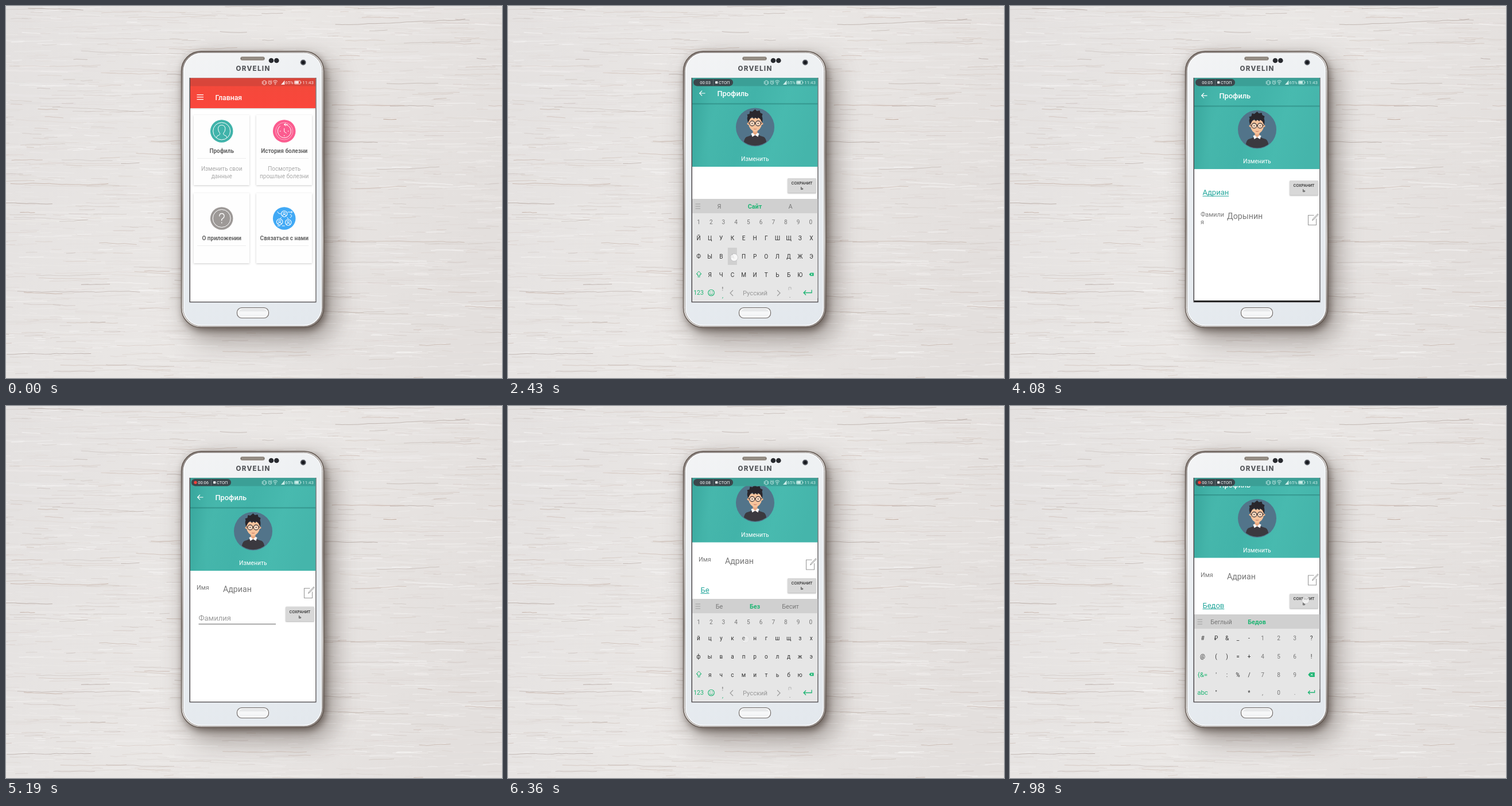
Write an HTML page with a canvas that moves like this. It is 864x648 px and loops after 8 s.

```html
<!DOCTYPE html>
<html lang="ru">
<head>
<meta charset="utf-8">
<style>
html, body { margin: 0; width: 100%; height: 100%; overflow: hidden; background: #e4e0dd; }
canvas { display: block; }
</style>
</head>
<body>
<canvas id="stage" width="864" height="648"></canvas>
<script>
const LOOP = 8000;
const FIRST = 'Адриан', LAST = 'Дорынин', NEW_LAST = 'Бедов';
const GREEN = '#20b574';
const stage = document.getElementById('stage');
let g = stage.getContext('2d');

// ---------- helpers ----------
const clamp = v => Math.max(0, Math.min(1, v));
const ease = (t, a, b) => { const p = clamp((t - a) / (b - a)); return p * p * (3 - 2 * p); };
function rect(x, y, w, h, fill) { g.fillStyle = fill; g.fillRect(x, y, w, h); }
function round(x, y, w, h, r, fill, stroke, lw = 1) {
  g.beginPath(); g.roundRect(x, y, w, h, r); paint(fill, stroke, lw);
}
function circle(x, y, r, fill, stroke, lw = 1) {
  g.beginPath(); g.arc(x, y, r, 0, 7); paint(fill, stroke, lw);
}
function shape(d, fill, stroke, lw = 1, x = 0, y = 0) {
  g.save(); g.translate(x, y);
  const p = new Path2D(d);
  if (fill) { g.fillStyle = fill; g.fill(p); }
  if (stroke) { g.strokeStyle = stroke; g.lineWidth = lw; g.stroke(p); }
  g.restore();
}
function paint(fill, stroke, lw) {
  if (fill) { g.fillStyle = fill; g.fill(); }
  if (stroke) { g.strokeStyle = stroke; g.lineWidth = lw; g.stroke(); }
}
function shadowed(color, blur, dx, dy, draw) {
  g.save();
  g.shadowColor = color; g.shadowBlur = blur; g.shadowOffsetX = dx; g.shadowOffsetY = dy;
  draw();
  g.restore();
}
function text(s, x, y, size, color, align = 'left', weight = 400) {
  g.font = `${weight} ${size}px Roboto, sans-serif`;
  g.textAlign = align; g.fillStyle = color; g.fillText(s, x, y);
}
function gradient(x0, y0, x1, y1, ...colors) {
  const gr = g.createLinearGradient(x0, y0, x1, y1);
  colors.forEach((c, i) => gr.addColorStop(i / (colors.length - 1), c));
  return gr;
}

// ---------- table and phone, drawn once ----------
let seed = 11;
const rnd = () => (seed = (seed * 16807) % 2147483647) / 2147483647;

function grain(count, colors, maxLen, maxAlpha, maxWidth) {
  for (let i = 0; i < count; i++) {
    let x = rnd() * 960 - 90, y = rnd() * 648;
    const end = x + 10 + rnd() * rnd() * maxLen, slope = (rnd() - .4) * .05;
    g.globalAlpha = maxAlpha * (.2 + .8 * rnd());
    g.strokeStyle = colors[Math.floor(rnd() * colors.length)];
    g.lineWidth = .4 + rnd() * maxWidth;
    g.beginPath(); g.moveTo(x, y);
    while (x < end) { x += 4 + rnd() * 8; y += slope * 8 + (rnd() - .5) * 1.6; g.lineTo(x, y); }
    g.stroke();
  }
  g.globalAlpha = 1;
}

function drawTable() {
  rect(0, 0, 864, 648, gradient(0, 0, 864, 300, '#e4e1e0', '#eae7e5', '#e3dfdd'));
  grain(300, ['#fff', '#d6cfcc', '#f5f2f1'], 300, .22, 4);
  grain(2200, ['#fff', '#cabfba', '#d8cdc8', '#f8f6f5'], 90, .5, 1.1);
  grain(260, ['#b59c8e', '#c2aba0', '#a3938c'], 240, .7, .7);
}

function drawPhone() {
  const body = () => round(305.5, 79, 248, 481, 34, '#7d716b');
  shadowed('rgba(70,56,50,.55)', 46, 13, 17, body);
  shadowed('rgba(60,48,42,.6)', 13, 3, 5, body);
  round(304, 198, 3, 52, 1, '#a09893'); round(552, 197, 3, 46, 1, '#837a75');
  round(305.5, 79, 248, 481, 34, gradient(306, 79, 553, 560, '#857c78', '#d8d5d3', '#a39c98', '#e0dedc', '#857c77'), '#61564f', 1.3);
  round(308.5, 81.5, 242, 476, 32, gradient(308, 81, 550, 556, '#f3f4f5', '#e9edf1', '#e3e8ed'), '#8b8582', 1);
  round(309.5, 82.5, 240, 474, 31, null, '#fbfcfd', 1.4);
  round(408.5, 88.5, 42, 6, 3, '#777069', '#aaa39d');
  for (let x = 411; x < 449; x += 2) rect(x, 89.5, 1, 4, '#b7ada3');
  circle(462, 95, 4.3, '#282a2f'); circle(471.3, 95, 4.3, '#282a2f');
  circle(517.7, 98.3, 5, '#40434a', '#c8cbd0'); circle(517.7, 98.3, 2.6, '#15171c');
  g.letterSpacing = '1.3px';
  g.font = '800 11.6px Inter, sans-serif'; g.textAlign = 'center';
  g.fillStyle = '#55575b'; g.fillText('ORVELIN', 430.5, 113);
  g.letterSpacing = '0px';
  round(402.5, 525.5, 55, 18, 8, gradient(0, 525, 0, 543, '#cfd1d3', '#f8f9fa', '#eceef0'), '#76706d', 1.2);
  round(404.5, 527.3, 51, 14.4, 7, null, '#fff', 1.2);
  rect(319.5, 125, 221, 391.3, '#4c484a');
}

const backdrop = document.createElement('canvas');
backdrop.width = 864; backdrop.height = 648;
const screenCtx = g;
g = backdrop.getContext('2d');
drawTable(); drawPhone();
g = screenCtx;

// ---------- status bar ----------
function drawStatus(t, color, ink) {
  rect(320, 125, 221, 14.5, color);
  round(448, 130, 4, 7, 1, null, ink, .9);
  shape('M446.3 131v5M453.7 131v5', null, ink, .8);
  circle(460, 133.5, 2.8, null, ink, .9);
  shape('M460 131.7v2h1.5M456.8 130.8l1.6-1.5M463.2 130.8l-1.6-1.5', null, ink, .8);
  shape('M465 131.5q4-3.6 8 0M466.4 133.4q2.6-2.2 5.2 0M467.7 135.2q1.3-1 2.6 0', null, ink, 1);
  circle(469, 136.5, .7, ink);
  shape('M479 137l6.5-7.5v7.5z', ink);
  text('65%', 486.5, 136, 7.6, ink);
  round(502.5, 130.3, 10.5, 5.8, 1, null, ink, .8); rect(503.3, 131, 6.5, 4.4, ink); rect(513.3, 132, 1, 2.5, ink);
  text('11:43', 516.3, 136, 7.9, ink);
  if (t < 60) return;
  const sec = t * .00125 + .1;
  round(323, 127, 69, 12.4, 6.2, '#3b474c');
  if (sec % 1 > .5 || sec > 10) circle(330, 133.3, 2.7, '#f4403a');
  text('00:' + String(Math.floor(sec)).padStart(2, '0'), 334.3, 136.1, 7.5, '#fff');
  rect(357, 128, .7, 10.4, '#6c777b');
  rect(361.2, 131.2, 4, 4, '#fff');
  text('СТОП', 367, 136.1, 7.4, '#fff');
}

// ---------- home ----------
const homeIcons = {
  profile(x, y) {
    circle(x, y, 15, null, '#fff');
    shape('M-9 11q0-3 5-4.5q1.5-1 .8-3q-3-3-3-8q.5-6 6.2-6t6.2 6q0 5-3 8q-.7 2 .8 3q5 1.5 5 4.5', null, '#fff', 1, x, y);
  },
  history(x, y) {
    shape('M-7-9a11.5 11.5 0 1 0 7-2.5h6M3-14l-3.5 2.5l3.5 2.5M0-5v6l4 2.5M-8 0h2M6 0h2M0 7v2', null, '#fff', 1, x, y);
    circle(x, y, 15, null, 'rgba(255,255,255,.6)', .8);
  },
  about(x, y) {
    circle(x, y, 15.5, null, '#fff');
    shape('M-4-3.5q0-5 4.2-5t4.2 4.5q0 2.5-2.5 4t-1.9 4M0 6.5v2', null, '#fff', 1.3, x, y);
  },
  contact(x, y) {
    for (const [dx, dy] of [[0, -8], [-8, 6], [7, 7]]) {
      circle(x + dx, y + dy, 5.2, null, '#fff', 1.1);
      circle(x + dx, y + dy - 1.3, 1.8, null, '#fff', 1);
      shape('M-3 4q0-3 3-3t3 3', null, '#fff', 1, x + dx, y + dy);
    }
    shape('M-12-12q2 5 6 4M6-11h8M12-13l2 2l-2 2M10-7q6 2 0 6M-12 13h5M-4 13h5M-5-2l-2 3M5-2l2 3', null, '#fff', 1, x, y);
  }
};

function drawCard(x, y, iconY, color, icon, title, lines = []) {
  const c = x + 48.7;
  shadowed('rgba(0,0,0,.2)', 3, 0, 1, () => rect(x, y, 97, 122, '#fefefe'));
  circle(c, iconY, 19.8, color);
  homeIcons[icon](c, iconY);
  text(title, c, iconY + 38, 10, '#666', 'center', 700);
  rect(x + 6, iconY + 47, 85, 1, '#eee');
  lines.forEach((s, i) => text(s, c, iconY + 69 + i * 12.5, 10, '#a9a9a9', 'center'));
}

function drawHome(t) {
  rect(320, 125, 221, 391, '#fff');
  rect(320, 139, 221, 39, gradient(0, 139, 0, 178, '#f4493b', '#fa463c'));
  rect(320, 178, 221, 2, 'rgba(0,0,0,.1)');
  for (const y of [154, 158, 162]) rect(332.5, y, 11.5, 1.3, '#fff');
  text('Главная', 364.5, 164, 12.3, '#fff', 'left', 500);
  drawCard(327, 190, 218, '#40b3aa', 'profile', 'Профиль', ['Изменить свои', 'данные']);
  drawCard(436, 190, 218, '#fb5c8f', 'history', 'История болезни', ['Посмотреть', 'прошлые болезни']);
  drawCard(327, 326, 370, '#9d9997', 'about', 'О приложении');
  drawCard(436, 326, 370, '#41a9f5', 'contact', 'Связаться с нами');
  rect(327, 190, 97, 122, `rgba(0,0,0,${.08 * ease(t, 160, 300)})`);
  drawStatus(t, '#d8453a', 'rgba(255,255,255,.85)');
}

// ---------- profile ----------
function drawAvatar(x, y) {
  g.save(); g.translate(x, y);
  circle(0, 0, 33.5, '#52748a');
  g.beginPath(); g.arc(0, 0, 32.3, 0, 7); g.clip();
  shape('M-21 36q1-17 6-19q7-2 10-4h10q3 2 10 4q5 2 6 19z', '#3b393f');
  rect(-4, 4, 8, 10, '#e9a981');
  shape('M-7 11l3-1l4 4l4-4l3 1l-2 6l-5-3l-5 3z', '#f6f6f6');
  shape('M-11.5-16h23v11q-1 9-11.5 14q-10.500-5-11.500-14z', '#f6c39c');
  circle(-12, -6, 2, '#f0b68d'); circle(12, -6, 2, '#f0b68d');
  shape('M-12-8q-3-6-1-11l-1-3l4-1l1-5l4 1l5-4l3 3l5-1l1 4l4 2l-1 4q2 6 0 11l-3-6l-4-3l-1 3l-4-3l-2 3l-3-4l-4 4z', '#29262c');
  for (const side of [-1, 1]) {
    circle(side * 5.2, -6.5, 4.4, 'rgba(255,255,255,.35)', '#322e31', 1.1);
    circle(side * 5.2, -6.5, .9, '#322e31');
  }
  shape('M-9.500-7h-2.500M9.500-7h2.500M-1-7h2', null, '#322e31', 1.1);
  shape('M-2.500 3q2.500 1.300 5 0', null, '#c26f5b', 1);
  g.restore();
}

function drawPencil(y) {
  shape('M529.500 2.500h-10v17h14v-11', null, '#999', 1.1, 0, y);
  shape('M526.500 11.500l1-2.500l8.500-9l1.300 1.300l-8.600 9z', '#eee', '#8c8c8c', .9, 0, y);
}

function drawSave(y) {
  shadowed('rgba(0,0,0,.3)', 2, 0, 1, () => round(487, y, 50, 25.5, 1.5, '#d8d8d8'));
  text('СОХРАНИТ', 512, y + 11, 7.1, '#333', 'center', 500);
  text('Ь', 512, y + 20, 7.1, '#333', 'center', 500);
}

function drawField(y, hint, value, focused) {
  if (value) {
    text(value, 335.5, y, 13, '#24a79c');
    rect(335.5, y + 1.6, g.measureText(value).width, 1, '#24a79c');
  } else if (!focused) {
    text(hint, 335.5, y, 13, '#9b9b9b');
    rect(335.5, y + 5.3, 134.5, 1.2, '#777');
  }
}

function drawHeader() {
  rect(320, 125, 221, 162, gradient(320, 125, 541, 190, '#3fada3', '#46b7ac', '#42b3a9', '#48baaf', '#45b5ab'));
  rect(320, 140, 30, 147, gradient(320, 0, 350, 0, 'rgba(20,125,118,.16)', 'rgba(20,125,118,0)'));
  rect(320, 176.5, 221, 3, gradient(0, 176.5, 0, 179.5, 'rgba(10,75,72,.4)', 'rgba(10,75,72,0)'));
  shape('M343.5 159h-9.5M338 154.7l-4.3 4.3l4.3 4.3', null, '#fff', 1.2);
  text('Профиль', 364.5, 164, 12.8, '#fff', 'left', 500);
  drawAvatar(430.5, 218);
  text('Изменить', 430.3, 277, 10.4, '#fff', 'center');
}

function drawProfile(t, s) {
  rect(320, 125, 221, 391, '#111');
  g.save(); g.translate(0, s.pan);
  rect(320, 125, 221, 391, '#fff');
  drawHeader();
  if (s.editing === 1) {
    drawField(332, 'Имя', s.name, s.focused);
    drawSave(307);
  } else {
    text('Имя', 332, 320, 10.8, '#777');
    text(FIRST, 378, 324, 14.2, '#777');
    drawPencil(315);
  }
  const drop = s.editing === 1 ? 7 : 0;
  if (s.editing === 2) {
    drawField(374, 'Фамилия', s.surname, s.focused);
    drawSave(349.5);
  } else {
    text('Фамили', 332, 363 + drop, 10.8, '#777');
    text('я', 332, 376 + drop, 10.8, '#777');
    text(LAST, 378, 367 + drop, 14.2, '#777');
    drawPencil(358 + drop);
  }
  g.restore();
  if (s.keyboard > 0) drawKeyboard(t, s);
  drawStatus(t, '#3b9f96', 'rgba(235,255,252,.8)');
}

// ---------- keyboard ----------
const ROWS = ['йцукенгшщзх', 'фывапролджэ', ' ячсмитьбю'];
const SYMBOLS = [
  ['#', '₽', '&', '_', '-', '1', '2', '3', '?'],
  ['@', '(', ')', '=', '+', '4', '5', '6', '!'],
  ['{&=', "'", ':', '%', '/', '7', '8', '9', ''],
  ['abc', '"', '', '', '*', ',', '0', '.', '']
];
const SYMBOL_X = [335.5, 359, 378, 397, 416.5, 440, 468, 496, 525];
const ROW_Y = [408, 440, 472, 503];
const keyX = i => 332 + 19.63 * i;

function keyAt(ch) {
  const row = ROWS.findIndex(r => r.includes(ch.toLowerCase()));
  return [keyX(ROWS[row].indexOf(ch.toLowerCase())), ROW_Y[row] - 4];
}

function suggestions(word) {
  if (!word) return ['Я', 'Сайт', 'А'];
  if (word[0] === 'А') return [word, word.length < 3 ? 'Адрес' : FIRST, 'А'];
  if (word === NEW_LAST) return ['Беглый', NEW_LAST, ''];
  return [word, word.length < 3 ? 'Без' : 'Беда', word.length < 3 ? 'Бесит' : 'Бедный'];
}

function drawDelete(x, y, k) {
  shape(`M${-5 * k} 0l${3 * k} ${-3.5 * k}h${7 * k}v${7 * k}h${-7 * k}z`, GREEN, null, 1, x, y);
  shape(`M${-k} ${-1.5 * k}l${3 * k} ${3 * k}m0 ${-3 * k}l${-3 * k} ${3 * k}`, null, '#fff', 1, x, y);
}

function drawEnter(x, y, k) {
  shape(`M${7 * k} ${-5 * k}v${5 * k}h${-14 * k}M${-3 * k} ${-4 * k}l${-4 * k} ${4 * k}l${4 * k} ${4 * k}`, null, GREEN, 1.3, x, y);
}

function drawKeyboard(t, s) {
  const word = s.editing === 1 ? s.name : s.surname;
  const top = s.symbols ? 363 : 336;
  g.save(); g.translate(0, (1 - s.keyboard) * 182);
  rect(320, top, 221, 516 - top, '#e6e6e6');
  rect(320, top, 221, 25, '#d0d0d0');
  for (const y of [9, 13, 17]) rect(326.5, top + y - .5, 8.5, .9, '#999');
  suggestions(word).forEach((w, i) =>
    text(w, 368 + 62 * i, top + 17, 10.8, i === 1 ? GREEN : '#777', 'center', i === 1 ? 700 : 400));
  if (s.symbols) drawSymbols(); else drawLetters(t, !word);
  g.restore();
}

function drawSymbols() {
  SYMBOLS.forEach((row, r) => row.forEach((ch, c) => {
    const color = ch.length > 1 ? GREEN : /[\d,.]/.test(ch) ? '#777' : '#333';
    text(ch, SYMBOL_X[c], ROW_Y[r], ch.length > 1 ? 11.5 : 10, color, 'center');
  }));
  drawDelete(525, 468, 1.15);
  drawEnter(525, 499, .8);
}

function drawLetters(t, caps) {
  for (const tap of taps) if (tap.key && t >= tap.at && t < tap.at + 90) rect(tap.x - 8, tap.y - 15, 16, 30, '#d0d0d0');
  for (let i = 0; i < 10; i++) text(String((i + 1) % 10), 332 + 21.7 * i, 380, 10, '#777', 'center');
  ROWS.forEach((row, r) => [...row].forEach((ch, i) =>
    text(caps ? ch.toUpperCase() : ch, keyX(i), ROW_Y[r], 10, '#333', 'center')));
  shape('M0-5l4.5 5h-2.5v3h-4v-3h-2.5zM-2 5h4', null, GREEN, 1, 332.5, 467);
  drawDelete(528.5, 467.5, .8);
  text('123', 332, 503, 10.5, GREEN, 'center');
  circle(354, 499.5, 5.3, null, GREEN, 1.1);
  circle(352.2, 498, .8, GREEN); circle(355.8, 498, .8, GREEN);
  shape('M351 500.5q3 4 6 0', null, GREEN, 1);
  round(372.9, 489, 1.8, 4, 1, '#999'); rect(373.4, 494, .8, 2, '#999');
  text(',', 374, 508, 10, GREEN, 'center');
  shape('M392 495l-5 5l5 5M469 495l5 5l-5 5', null, '#999', 1.1);
  text('Русский', 430.5, 503.5, 11.2, '#999', 'center');
  shape('M489 495v-5h4v4', null, '#aaa', .8);
  text('.', 491, 508, 10, '#777', 'center');
  drawEnter(522, 499.5, 1);
}

// ---------- timeline ----------
const FIRST_AT = [2410, 2620, 2820, 3030, 3240, 3440];
const LAST_AT = [5930, 6240, 6540, 6800, 7060];
const typed = (word, times, t) => word.slice(0, times.filter(at => t >= at + 60).length);
const keyTaps = (word, times) => [...word].map((ch, i) => {
  const [x, y] = keyAt(ch);
  return { at: times[i], x, y, key: true };
});
const taps = [
  { at: 120, x: 378, y: 248 }, { at: 1260, x: 528, y: 325 }, { at: 1780, x: 402, y: 328 },
  ...keyTaps(FIRST, FIRST_AT),
  { at: 4330, x: 512, y: 322 }, { at: 4840, x: 528, y: 368 }, { at: 5310, x: 402, y: 368 },
  ...keyTaps(NEW_LAST, LAST_AT),
  { at: 7300, x: 333, y: 499 }, { at: 7910, x: 512, y: 336 }
];

function stateAt(t) {
  return {
    editing: t >= 1400 && t < 4470 ? 1 : t >= 4980 ? 2 : 0,
    focused: t >= 1840 && t < 4470 || t >= 5370,
    name: typed(FIRST, FIRST_AT, t),
    surname: typed(NEW_LAST, LAST_AT, t),
    symbols: t >= 7380,
    keyboard: ease(t, 1980, 2150) - ease(t, 3900, 4050) + ease(t, 5480, 5660),
    pan: -7 * ease(t, 1990, 2160) + 7 * ease(t, 4020, 4130)
      - 49.5 * ease(t, 5500, 5690) + 27 * ease(t, 7380, 7500)
  };
}

function drawTaps(t) {
  for (const { at, x, y } of taps) {
    if (t < at || t > at + 150) continue;
    g.globalAlpha = clamp((at + 150 - t) / 110);
    circle(x + 3, y + 2, 6.5, 'rgba(255,255,255,.85)', 'rgba(150,150,155,.5)', .8);
  }
  g.globalAlpha = 1;
}

function frame() {
  const t = performance.now() % LOOP;
  g.drawImage(backdrop, 0, 0);
  g.save();
  g.beginPath(); g.rect(321, 125.5, 218.3, 389.5); g.clip();
  const enter = ease(t, 360, 640);
  if (enter < 1) drawHome(t);
  if (enter > 0) {
    g.save();
    g.globalAlpha = enter; g.translate(0, (1 - enter) * 45);
    drawProfile(t, stateAt(t));
    g.restore();
    if (enter < 1) drawStatus(t, '#3b9f96', 'rgba(235,255,252,.8)');
  }
  drawTaps(t);
  g.restore();
  requestAnimationFrame(frame);
}
requestAnimationFrame(frame);
</script>
</body>
</html>
```
